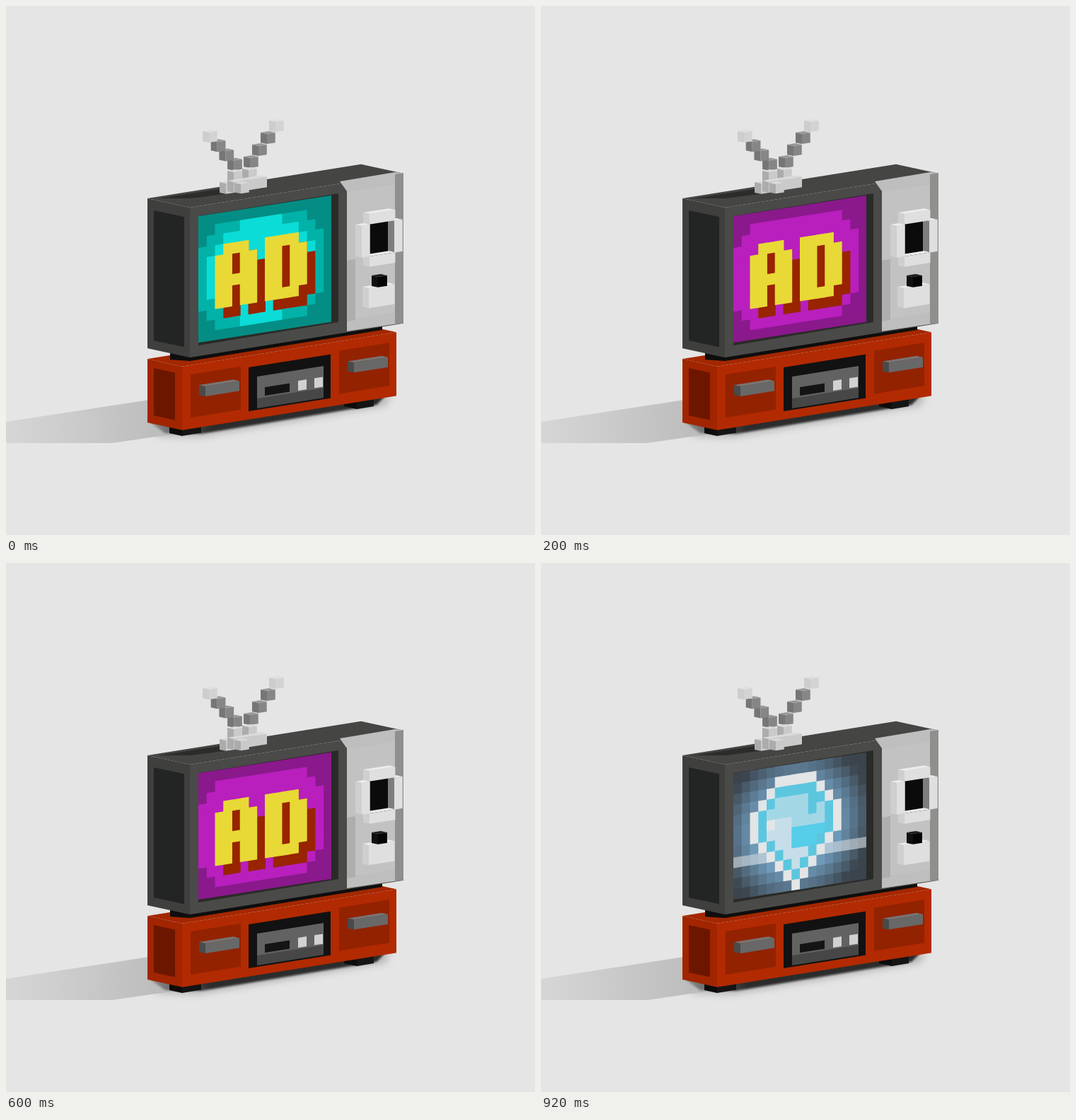
These frames come from a looping animation (748x748 px, 1 s). An HTML page with a canvas:

```html
<!DOCTYPE html>
<html lang="en">
<head>
<meta charset="utf-8">
<title>Voxel television</title>
<style>
html, body { margin: 0; width: 100%; height: 100%; overflow: hidden; background: #e5e5e5; }
canvas { display: block; }
</style>
</head>
<body>
<canvas id="stage" width="748" height="748"></canvas>
<script>
const ctx = document.getElementById('stage').getContext('2d');
const SLOPE = -0.16, SIDE = 0.217;
const VOXEL = { d: 9, w: 11.75, h: 14.9 };

function poly(color, ...p) {
  ctx.fillStyle = color;
  ctx.beginPath();
  for (let i = 0; i < p.length; i += 2) ctx.lineTo(p[i], p[i + 1]);
  ctx.fill();
}
// Upright faces: x, y is the top left corner
function face(color, x, y, w, h, k = SLOPE) {
  poly(color, x, y, x + w, y + w * k, x + w, y + w * k + h, x, y + h);
}
const side = (color, x, y, w, h) => face(color, x, y, w, h, SIDE);

// Solid block: x, y is the top of its left edge, d the depth, w the width
function box(x, y, d, w, h, [top, left, front]) {
  const e = y + d * SIDE;
  poly(top, x, y, x + w, y + w * SLOPE, x + d + w, e + w * SLOPE, x + d, e);
  side(left, x, y, d, h);
  face(front, x + d, e, w, h);
}
function voxels(x, y, cols, rows, tone) {
  box(x, y, VOXEL.d, cols * VOXEL.w, rows * VOXEL.h, tone);
}
function fade(x0, x1, from, to) {
  const g = ctx.createLinearGradient(x0, 0, x1, 0);
  g.addColorStop(0, from);
  g.addColorStop(1, to);
  return g;
}
function soft(radius, draw) {
  ctx.filter = `blur(${radius}px)`;
  draw();
  ctx.filter = 'none';
}

function drawFloor() {
  ctx.fillStyle = '#e5e5e5';
  ctx.fillRect(0, 0, 748, 748);
  poly(fade(0, 215, '#d6d6d6', '#bdbdbd'), 0, 588, 130, 568, 202, 557, 240, 605, 150, 618, 0, 618);
  soft(5, () => poly('#bcbcbc', 205, 590, 545, 550, 537, 566, 420, 586, 270, 611, 215, 609));
  soft(1.5, () => poly(fade(205, 290, '#8c8c8c', '#2c2c2c'), 203, 588, 540, 548, 524, 564, 276, 605, 225, 604));
}

function drawStand() {
  const black = ['#101010', '#0c0c0c', '#151515'];
  box(231, 590, 18, 27, 14, black);
  box(478, 552, 18, 24, 14, black);
  box(200, 499, 49, 303, 90, ['#a42700', '#a02500', '#b22a01']);
  side('#6c1600', 209, 512, 30, 67);
  for (const x of [261, 471]) {
    const y = 521 + (x - 261) * SLOPE;
    face('#932200', x, y, 71, 61);
    box(x + 12, y + 15, 9, 48, 14, ['#767676', '#4a4a4a', '#686868']);
  }
  face('#121212', 343, 511, 116, 62);
  face('#626262', 355, 524, 94, 32);
  face('#474747', 355, 555, 94, 14);
  face('#141414', 366, 539, 35, 12);
  for (const x of [413, 436]) face('#d1d1d1', x, 530 + (x - 413) * SLOPE, 12, 14);
}

function drawControls() {
  const white = ['#ececec', '#cfcfcf', '#dfdfdf'];
  poly('#bebebe', 472, 248, 550, 235, 562, 236, 562, 448, 482, 460, 482, 262);
  face('#c2c2c2', 482, 263, 68, 181);
  face('#aeaeae', 482, 360, 12, 86);
  face('#8f8f8d', 550, 238, 12, 212);

  // Dial: a ring of four blocks around a dark hole
  face('#0b0b0b', 514, 308, 36, 50);
  voxels(540, 302, 1, 3, ['#ececec', '#7d7d7d', '#dfdfdf']);
  voxels(505, 292, 3.1, 1, white);
  voxels(505, 352, 3.1, 1, white);
  voxels(494, 309, 1, 3, white);

  voxels(504, 397, 3.1, 1.9, white);
  voxels(517, 381, 1.1, 1, ['#1d1d1d', '#101010', '#050505']);
}

function drawAntenna() {
  const pale = ['#dedede', '#cdcdcd', '#d3d3d3'];
  const grey = ['#999999', '#767676', '#868686'];
  const base = ['#dadada', '#acacac', '#cacaca'];
  poly('#2c2c2a', 216, 272, 300, 259, 322, 264, 262, 272);
  for (let i = 3; i >= 0; i--) {
    const tone = i ? grey : pale;
    voxels(278 + i * 11.7, 177 + i * 13.2, 1, 0.95, tone);
    voxels(372 - i * 12, 162 + i * 17, 1, 0.95, tone);
  }
  voxels(313, 233, 1, 1, base);
  voxels(334, 230, 1, 1.2, base);
  voxels(302, 249, 1, 1, base);
  voxels(313, 247, 4, 1, base);
  voxels(323, 250, 1, 0.9, base);
}

function drawBody() {
  poly('#0e0e0e', 232, 488, 532, 445, 532, 458, 260, 502, 232, 500);
  box(200, 272, 60, 302, 212, ['#454543', '#3f3f3e', '#4a4a48']);
  side('#232424', 209, 289, 43, 184);
  poly('#2a2a28', 272, 297, 470, 265, 470, 447, 272, 480);
  drawControls();
  drawAntenna();
}

// Screen: 16 columns by 12 rows, symmetric around column 7 and row 5.5
const COLS = 16, ROWS = 12, MID = 7, MID_ROW = 5.5;
function cell(c, r, color, w = 1) {
  ctx.fillStyle = color;
  ctx.fillRect(c, r, Math.min(w + 0.08, COLS - c), Math.min(1.06, ROWS - r));
}
function blob(halfWidth, color) {
  for (let r = 1; r <= 10; r++) {
    const half = halfWidth(Math.abs(r - MID_ROW));
    cell(MID - half, r, color, 2 * half + 1);
  }
}
const chamfer = dy => 7 - Math.max(0, dy - 2.5);
const oval = dy => Math.floor(6.4 * Math.sqrt(1 - dy * dy / 25));

// Letters are five columns by six rows with a one-column hole
const inA = (x, y) => !(x === 2 && y > 0 && y !== 3) && !(y === 0 && x % 4 === 0);
const inD = (x, y) => !(x === 2 && y > 0 && y < 5) && !(x === 4 && y % 5 === 0);
function drawLetters(shift, color) {
  for (let y = 0; y < 6; y++) {
    for (let x = 0; x < 5; x++) {
      if (inA(x, y)) cell(x + 2 + shift, y + 3 + shift, color);
      if (inD(x, y)) cell(x + 8 + shift, y + 3 + shift, color);
    }
  }
}
function drawAd(dark, mid, light) {
  ctx.fillStyle = dark;
  ctx.fillRect(0, 0, COLS, ROWS);
  blob(chamfer, mid);
  if (light) blob(oval, light);
  drawLetters(1, '#982400');
  drawLetters(0, '#e8d936');
}

const WHITE = '#e3e5e6', CYAN = '#5dc6df', LIGHT = '#a4d7e6', PALE = '#c5dee9', BRIGHT = '#56cde9';
const mix = (a, b, t) => a.map((v, i) => v + (b[i] - v) * t);

function gemColor(dx, r) {
  const half = Math.min(r + 1, 5, 11 - r), edge = half - Math.abs(dx);
  if (r < 1 || edge < 0) return null;
  if (edge === 0 || r === 1) return WHITE;
  if (dx === -3 && r === 5) return WHITE;
  if (edge === 1 || r === 2) return CYAN;
  if (dx === 2 && r < 5) return CYAN;
  if (r > 7) return PALE;
  if (r > 5 && dx >= 0) return BRIGHT;
  return r > 4 && dx < 0 ? PALE : LIGHT;
}
function glowColor(dx, r) {
  const d = Math.hypot(dx / 8, (r - MID_ROW) / 6.5);
  const t = Math.min(1, Math.max(0, (d - 0.5) / 0.65));
  let rgb = mix([127, 182, 221], [59, 67, 76], t);
  if (r === 8) rgb = mix(rgb, [225, 229, 232], 0.55);
  return `rgb(${rgb.map(Math.round)})`;
}
function drawGem() {
  for (let r = 0; r < ROWS; r++) {
    for (let c = 0; c < COLS; c++) cell(c, r, gemColor(c - MID, r) || glowColor(c - MID, r));
  }
}

function drawScreen(step) {
  ctx.save();
  ctx.transform(VOXEL.w, -1.84, 0, VOXEL.h, 272, 297.3);
  if (step === 4) drawGem();
  else if (step % 2) drawAd('#8a198c', '#b81fbd');
  else drawAd('#048d84', '#02b2a8', '#0bdcd7');
  ctx.restore();
}

let shown = -1;
function tick(now) {
  const step = Math.floor(now % 1000 / 200);
  if (step !== shown) {
    shown = step;
    drawFloor();
    drawStand();
    drawBody();
    drawScreen(step);
  }
  requestAnimationFrame(tick);
}
tick(0);
</script>
</body>
</html>
```
